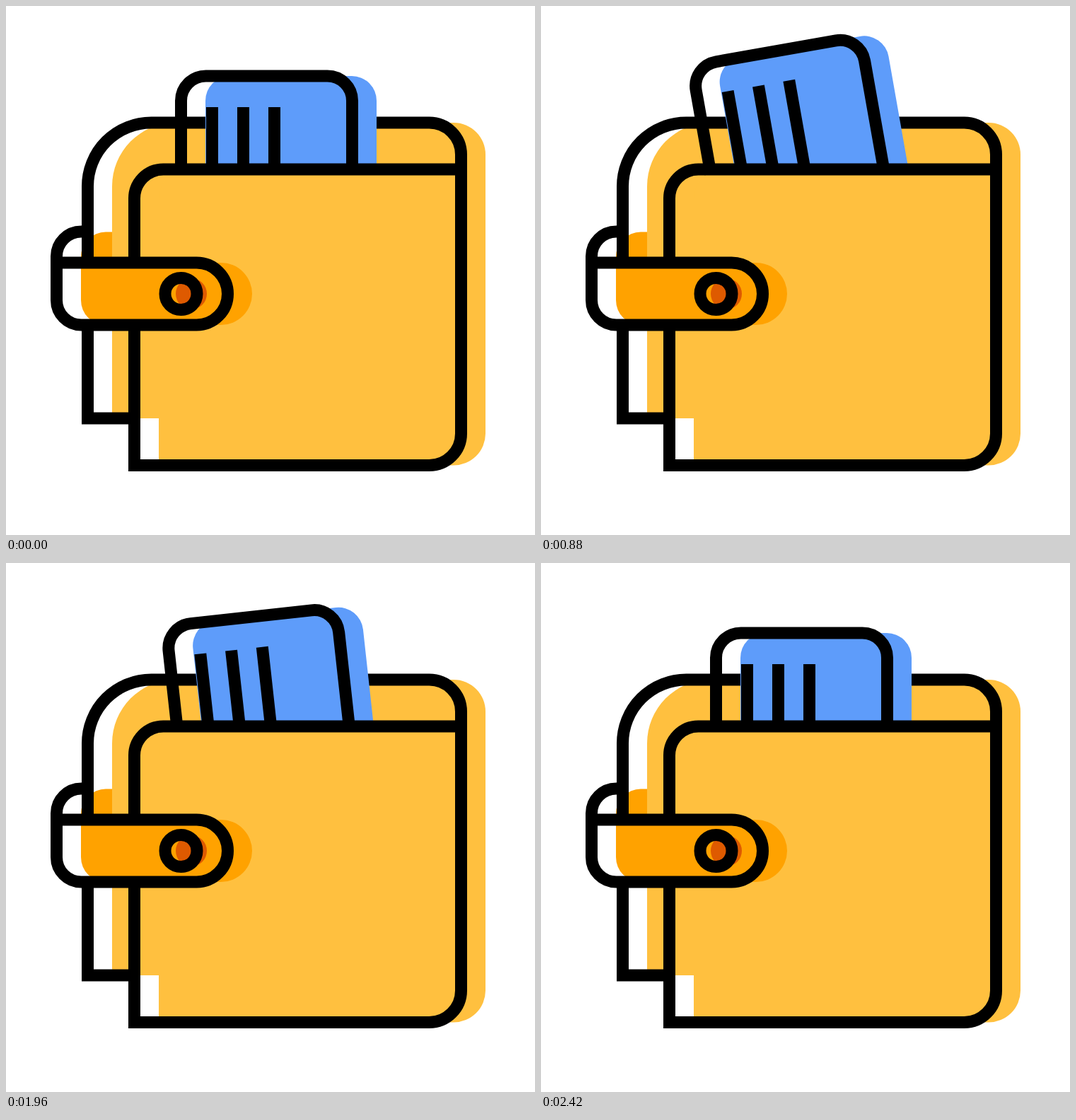
Recreate the animation shown at these times as an HTML page. Size 748 by 748 pixels, loop 2460 ms.

```html
<!DOCTYPE html>
<html lang="en">
<head>
<meta charset="utf-8">
<title>Wallet</title>
<style>
  html, body { margin: 0; width: 100%; height: 100%; overflow: hidden; background: #fff; }
  svg { display: block; width: 100%; height: 100%; }
  .line { fill: none; stroke: #000; stroke-width: 17; }
  .leather { fill: #ffc03f; }
  .strap { fill: #ffa200; }
</style>
</head>
<body>
<svg viewBox="0 0 748 748">
  <!-- back of the wallet -->
  <path class="strap" d="M160 319.5H141a35 35 0 0 0-35 35V380H160z"/>
  <path class="leather" d="M150 583V255a90 90 0 0 1 90-90H633a45 45 0 0 1 45 45V583z"/>
  <path class="line" d="M181.5 583H115.5V255a90 90 0 0 1 90-90H598.5a45 45 0 0 1 45 45V231"/>

  <g id="card">
    <path fill="#5e9cfa" d="M282 330V134a35 35 0 0 1 35-35H489a35 35 0 0 1 35 35V330z"/>
    <path class="line" d="M247.5 330V134a35 35 0 0 1 35-35H454.5a35 35 0 0 1 35 35V330M291.5 143V330M335.5 143V330M379.5 143V330"/>
  </g>

  <!-- front of the wallet -->
  <path class="leather" d="M216 649.5V272a41 41 0 0 1 41-41H678V604.5a45 45 0 0 1-45 45z"/>
  <path class="line" d="M643.5 231H222.5a41 41 0 0 0-41 41V649.5H598.5a45 45 0 0 0 45-45V222"/>

  <!-- strap and button -->
  <path fill="#fff" d="M71.5 363V416a35 35 0 0 0 35 35H269.5a44 44 0 0 0 0-88z"/>
  <path class="strap" d="M106 363V416a35 35 0 0 0 35 35H304a44 44 0 0 0 0-88z"/>
  <circle cx="262" cy="407" r="22" fill="#de5a00"/>
  <circle class="line" cx="247.5" cy="407" r="22.5"/>
  <path class="line" d="M108 319H106.5a35 35 0 0 0-35 35V416a35 35 0 0 0 35 35H269.5a44 44 0 0 0 0-88H72"/>
</svg>
<script>
  const LOOP = 2460, MOVE = 600, OUT = 600, BACK = 1800, TILT = -12;
  const card = document.getElementById('card');

  // cubic-bezier(.4, 0, 0, 1)
  function ease(x) {
    if (x <= 0) return 0;
    if (x >= 1) return 1;
    let low = 0, high = 1, s;
    for (let i = 0; i < 30; i++) {
      s = (low + high) / 2;
      if (1.2 * s * (1 - s) ** 2 + s ** 3 < x) low = s; else high = s;
    }
    return s * s * (3 - 2 * s);
  }

  const start = performance.now();
  function draw() {
    const t = (performance.now() - start) % LOOP;
    const angle = TILT * (ease((t - OUT) / MOVE) - ease((t - BACK) / MOVE));
    card.setAttribute('transform', `rotate(${angle} 150 288)`);
    requestAnimationFrame(draw);
  }
  draw();
</script>
</body>
</html>
```
